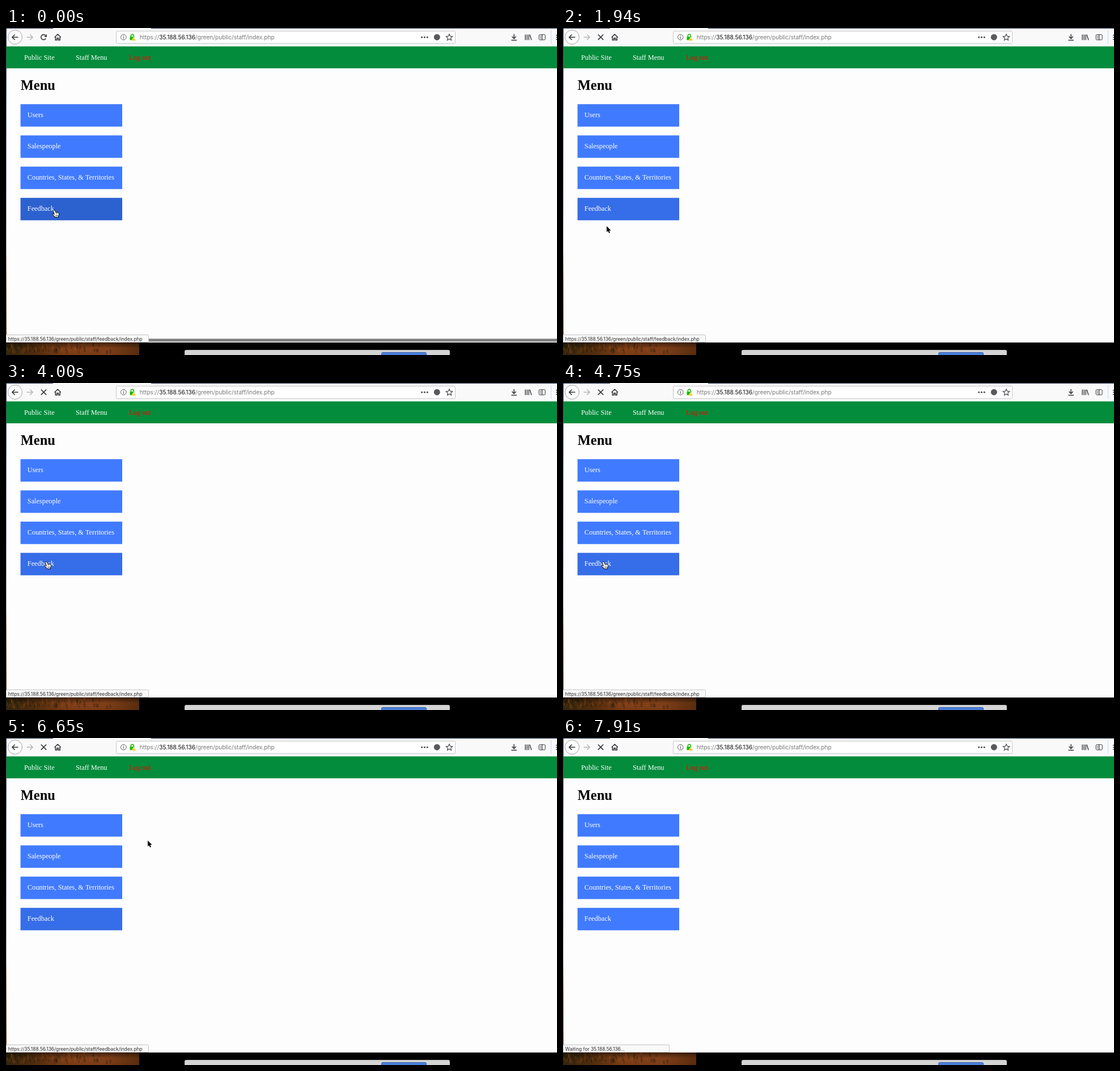
An HTML page with a canvas for the animation above (8000 ms loop, 972x576 px).

```html
<!DOCTYPE html>
<html lang="en">
<head>
<meta charset="utf-8">
<title>Staff menu</title>
<style>
html, body { margin: 0; width: 100%; height: 100%; overflow: hidden; background: #000; }
canvas { display: block; }
</style>
</head>
<body>
<canvas id="stage" width="972" height="576"></canvas>
<script>
const ctx = document.getElementById('stage').getContext('2d');
const LOOP = 8000;
const SERIF = '"Liberation Serif", serif';
const SANS = 'Inter, sans-serif';
const INK = '#38383d';
const HOST = '35.188.56.136';
const BLUE = '#407aff', HOVER = '#2c61d0', FOCUS = '#366de8';

// Cursor stops: [time, shape, x, y]
const CURSOR = [
  [0, 'hand', 81, 320],
  [1470, 'arrow', 85, 332],
  [1620, 'arrow', 82, 343],
  [1770, 'arrow', 79, 352],
  [1920, 'arrow', 77, 349],
  [2170, 'arrow', 75, 336],
  [2320, 'arrow', 73, 322],
  [2470, 'arrow', 72, 315],
  [2770, 'hand', 67, 314],
  [5890, 'arrow', 120, 316],
  [6180, 'arrow', 187, 312],
  [6350, 'hand', 182, 311],
  [6650, 'arrow', 250, 180.5],
  [6890, 'arrow', 262, 144],
  [7040, 'arrow', 276, 104],
  [7190, 'arrow', 290, 66],
  [7340, 'arrow', 302, 32],
  [7610, 'arrow', 310, 6],
  [7760, 'none', 0, 0]
];
const RELOAD = [[0, 'reload'], [180, 'ring'], [450, 'stop'], [5200, 'reload'], [5380, 'ring'], [5590, 'stop']];
const BAR = [[0, true], [720, false], [5200, true], [5740, false]];
const FEEDBACK = [[0, HOVER], [180, FOCUS], [6890, BLUE]];

const at = (steps, t) => steps.filter(s => s[0] <= t).pop();

function rect(x, y, w, h, color) {
  ctx.fillStyle = color;
  ctx.fillRect(x, y, w, h);
}

function text(str, x, y, font, color) {
  ctx.font = font;
  ctx.fillStyle = color;
  ctx.fillText(str, x, y);
  return x + ctx.measureText(str).width;
}

function stroke(d, color = INK, width = 1.5) {
  ctx.strokeStyle = color;
  ctx.lineWidth = width;
  ctx.stroke(new Path2D(d));
}

function fill(d, color = INK) {
  ctx.fillStyle = color;
  ctx.fill(new Path2D(d));
}

function circle(x, y, r, color) {
  ctx.beginPath();
  ctx.arc(x, y, r, 0, Math.PI * 2);
  ctx.fillStyle = color;
  ctx.fill();
}

function box(x, y, w, h, r, back, edge) {
  ctx.beginPath();
  ctx.roundRect(x, y, w, h, r);
  ctx.fillStyle = back;
  ctx.fill();
  ctx.strokeStyle = edge;
  ctx.lineWidth = 1;
  ctx.stroke();
}

function gradient(x0, y0, x1, y1, stops) {
  const g = ctx.createLinearGradient(x0, y0, x1, y1);
  stops.forEach(([p, c]) => g.addColorStop(p, c));
  return g;
}

function drawDesktop() {
  rect(0, 0, 972, 576, '#000');
  rect(0, 0, 1, 554, gradient(0, 0, 0, 554,
    [[0, '#29384f'], [0.3, '#73839b'], [0.7, '#a3a6ae'], [0.8, '#a06a35'], [1, '#5c3512']]));
  rect(0, 554, 235, 22, gradient(0, 0, 235, 0,
    [[0, '#3a2a10'], [0.2, '#57300f'], [0.45, '#8a441a'], [0.75, '#8d451c'], [1, '#63310f']]));
  rect(0, 554, 235, 22, gradient(0, 554, 0, 576,
    [[0, 'rgba(15,10,3,.6)'], [0.45, 'rgba(15,10,3,.1)'], [1, 'rgba(15,10,3,.15)']]));
  let seed = 7;
  const rnd = () => (seed = seed * 16807 % 2147483647) / 2147483647;
  for (let i = 0; i < 130; i++) {
    const x = rnd() * rnd() * 232;
    rect(x, 554 + rnd() * 14, 1 + rnd() * 2, 2 + rnd() * 6,
      rnd() < 0.65 ? 'rgba(25,20,5,.3)' : 'rgba(165,90,30,.25)');
  }
  box(315.5, 567.5, 467, 14, 2, '#d4d4d4', '#c2c2c2');
  box(662.5, 571.5, 79, 14, 2, '#4a80da', '#3561b0');
}

function drawReload(kind) {
  if (kind === 'stop') return stroke('M61.8 11.5l9.4 9.4M71.2 11.5l-9.4 9.4', INK, 1.7);
  if (kind === 'ring') return stroke('M64.2 20.2A4.5 4.5 0 1 1 68.8 20.2', INK, 1.6);
  stroke('M70.3 18.3A4.5 4.5 0 1 1 69.5 12.9', INK, 1.6);
  fill('M72 10.8v5h-5z');
}

function drawToolbar(kind) {
  rect(1, 0, 971, 33, '#f9f9fa');
  rect(0, 0, 83, 1, '#26364f');
  rect(256, 0, 716, 1, '#26364f');

  box(3.5, 3.5, 25, 25, 12.5, '#fcfcfc', '#a5a5a8');
  stroke('M21.5 16.2H11M15.6 11.5L10.9 16.2l4.7 4.7', INK, 1.6);
  stroke('M36.5 16.2H47M42.4 11.5l4.7 4.7-4.7 4.7', '#b8b8ba', 1.5);
  drawReload(kind);
  stroke('M85.6 16.5L91.2 11l5.6 5.5M87.3 16v5.3h2.7v-3.5h2.4v3.5h2.7V16', INK, 1.6);

  box(194.5, 5.5, 598, 22, 2, '#fff', '#c7c7ca');
  ctx.beginPath();
  ctx.arc(207.3, 16.2, 4.8, 0, Math.PI * 2);
  ctx.strokeStyle = '#5c5c60';
  ctx.lineWidth = 1;
  ctx.stroke();
  rect(206.8, 13.3, 1.1, 1.2, '#5c5c60');
  rect(206.8, 15.4, 1.1, 3.8, '#5c5c60');

  stroke('M220.3 16v-2.3a2.5 2.5 0 0 1 5 0V16', '#12bc00', 1.5);
  rect(218.5, 15.3, 8, 6, '#12bc00');
  fill('M225.3 15.4l4.4 7.1h-8.8z', '#fff');
  fill('M225.3 16.4l3.6 5.6h-7.2z', '#ffbf00');
  rect(225, 18, 0.8, 2, '#fff');

  const font = '10.15px ' + SANS;
  let x = text('https://', 235.8, 20, font, '#77777a');
  x = text(HOST, x, 20, font, '#0c0c0d');
  text('/green/public/staff/index.php', x, 20, font, '#77777a');

  [733.6, 738.4, 743.2].forEach(cx => circle(cx, 16.2, 1.5, '#4a4a4f'));
  circle(760.3, 16.2, 5.5, '#5a5a5e');
  let star = '';
  for (let i = 0; i < 10; i++) {
    const a = i * Math.PI / 5 - Math.PI / 2, r = i % 2 ? 2.8 : 6;
    star += (i ? 'L' : 'M') + (782 + r * Math.cos(a)) + ' ' + (16.7 + r * Math.sin(a));
  }
  stroke(star + 'Z', '#4a4a4f', 1.2);

  stroke('M896.2 10.8v7.5M892.6 15l3.6 3.6 3.6-3.6M891.4 21.4h9.6', INK, 1.5);
  stroke('M916.2 11.5v9.8M919.2 11.5v9.8M922.2 11.5v9.8M924 11.7l3 9.5', INK, 1.4);
  box(940.2, 11.7, 11, 9.2, 1.5, '#f9f9fa', INK);
  stroke('M945.6 11.7v9.2', INK, 1.2);
  stroke('M942 14.2h2M942 16.2h2M942 18.2h2', INK, 0.8);
  rect(961, 4, 1, 24, '#cfd5ec');
  [12, 15.6, 19.2].forEach(y => rect(970, y, 2, 1.4, INK));
}

function drawPage(feedback) {
  rect(1, 32.4, 971, 521.6, '#fdfdfe');
  rect(1, 32.4, 971, 38.6, '#028c3b');
  const font = '12.3px ' + SERIF;
  text('Public Site', 32, 56, font, '#fff');
  text('Staff Menu', 123, 56, font, '#fff');
  text('Log out', 217, 56, font, '#f00');
  text('Menu', 25.7, 108.7, 'bold 24.5px ' + SERIF, '#000');
  ['Users', 'Salespeople', 'Countries, States, & Territories', 'Feedback'].forEach((label, i) => {
    const y = 134.2 + i * 55;
    rect(25.6, y, 179.4, 39.5, i === 3 ? feedback : BLUE);
    text(label, 37.8, Math.round(y + 23), font, '#fff');
  });
}

function drawStatus(waiting, bar) {
  if (bar) rect(251, 547.3, 721, 5.2, '#808080');
  const w = waiting ? 187 : 251;
  box(0.5, 540.5, w, 13, [0, 2, 0, 0], '#f9f9fa', '#c4c4c6');
  text(waiting ? `Waiting for ${HOST}…` : `https://${HOST}/green/public/staff/feedback/index.php`,
    3.8, 551, '8.38px ' + SANS, '#2c2c2e');
}

const SHAPES = {
  arrow: 'M0 0V10.6L2.4 8.4L4 12.2L5.9 11.4L4.3 7.7H7.6Z',
  hand: 'M3.2 1.2C4.4 .2 5.3 .9 5.7 2L6.9 4.9C7.6 4.2 8.5 4.4 8.9 5C9.7 4.5 10.5 4.8 10.8 5.5' +
    'C11.7 5.3 12.3 5.9 12.4 7L12.4 9.3L11.6 11.3V13.3H5.5L4.9 11.9L1.1 8.7' +
    'C.6 7.7 1.6 6.9 2.6 7.5L4.3 8.4L2.6 3.2C2.3 2.3 2.5 1.7 3.2 1.2Z'
};

function drawCursor([, shape, x, y]) {
  if (shape === 'none') return;
  const arrow = shape === 'arrow';
  ctx.save();
  ctx.translate(x, y);
  ctx.lineJoin = 'round';
  if (arrow) {
    stroke(SHAPES.arrow, '#fff', 1.6);
    fill(SHAPES.arrow, '#000');
  } else {
    fill(SHAPES.hand, '#fff');
    stroke(SHAPES.hand, '#000', 1);
    stroke('M7 5l.7 2.4M9 5.4l.5 2M6.8 9.3v2.3M8.5 9.3v2.3M10.2 9.3v2.3', '#000', 0.7);
  }
  ctx.restore();
}

function frame(now) {
  const t = now % LOOP;
  drawDesktop();
  drawToolbar(at(RELOAD, t)[1]);
  drawPage(at(FEEDBACK, t)[1]);
  drawStatus(t >= 6890, at(BAR, t)[1]);
  drawCursor(at(CURSOR, t));
}

const start = performance.now();
function tick() {
  frame(performance.now() - start);
  requestAnimationFrame(tick);
}
tick();
</script>
</body>
</html>
```
